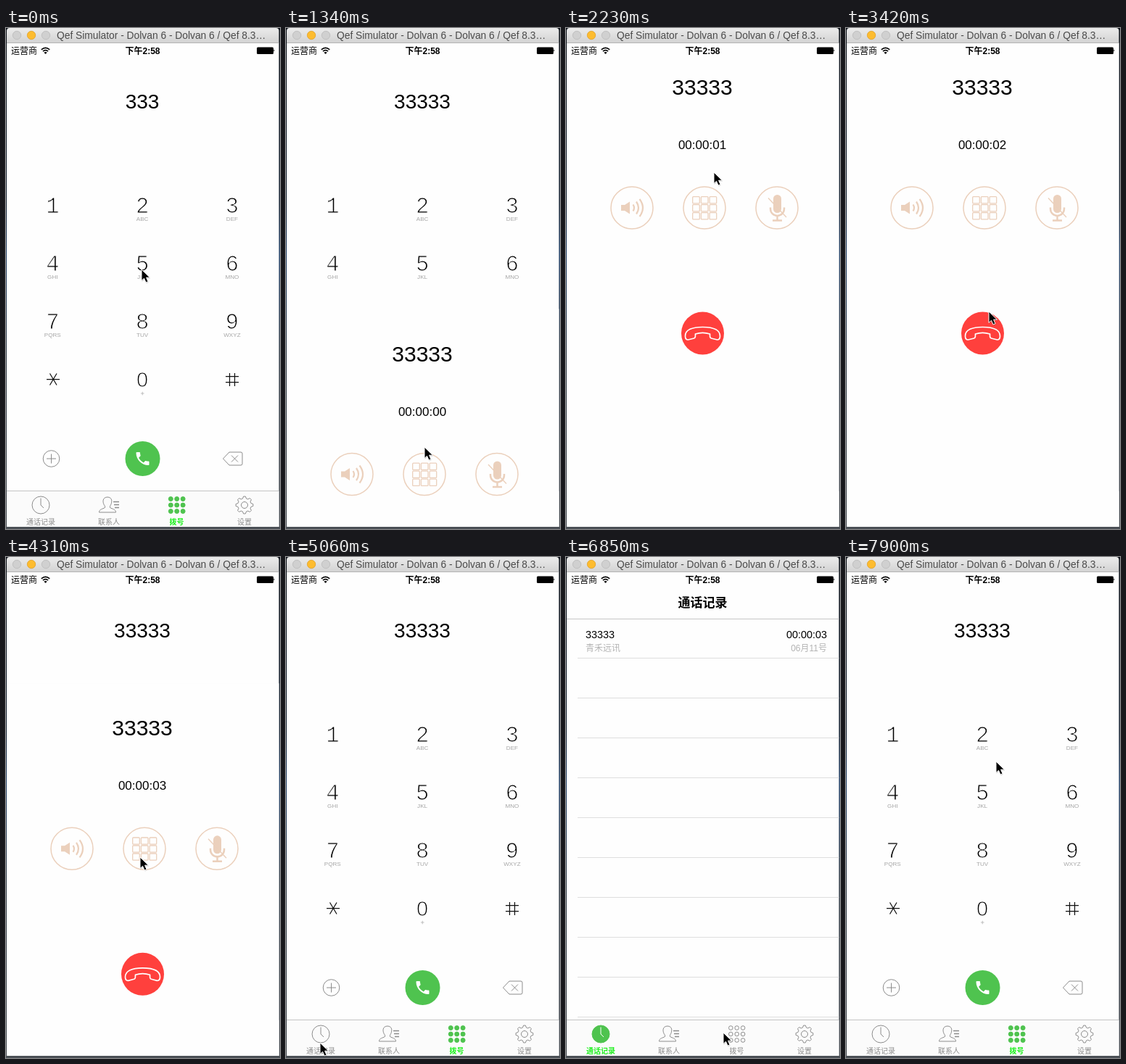
Write an HTML page that moves like this. It is 378 px wide and 691 px high and loops after 8 s.

```html
<!DOCTYPE html>
<html lang="zh">
<head>
<meta charset="utf-8">
<title>Dialer</title>
<style>
html, body { margin: 0; width: 100%; height: 100%; overflow: hidden; background: #1b2430; }
svg { display: block; width: 378px; height: 691px; }
text { font-family: "Liberation Sans", "Noto Sans CJK SC", "Noto Sans CJK", sans-serif; }
.mid { text-anchor: middle; }
.end { text-anchor: end; }
.key { font-family: "Liberation Mono", monospace; font-size: 30.5px; stroke: #fefefe; stroke-width: 1.1; }
.zero { font-family: "Liberation Sans", sans-serif; font-size: 29px; }
.sub { font-size: 8.1px; fill: #a6a6a6; }
.line { fill: none; stroke: #8c8c8c; stroke-width: 1; }
.thin { fill: none; stroke: #111; stroke-width: 1.25; }
.tan { fill: none; stroke: #ebd0bc; stroke-width: 1.5; }
.fill { fill: #ebd0bc; stroke: none; }
.tab { font-size: 10px; fill: #8c8c8c; }
.tab.on { fill: #1df01d; font-weight: bold; }
.small { font-size: 12px; fill: #b4b4b4; }
.row { font-size: 14.4px; }
</style>
</head>
<body>
<svg viewBox="0 0 378 691">
  <defs>
    <linearGradient id="bar" x2="0" y2="1">
      <stop stop-color="#ebebeb"/><stop offset="1" stop-color="#d2d2d2"/>
    </linearGradient>
    <linearGradient id="desk" x2="0" y2="1">
      <stop stop-color="#10151c"/><stop offset=".35" stop-color="#1d2a3a"/>
      <stop offset=".45" stop-color="#2c4a70"/><stop offset=".65" stop-color="#3a444f"/>
      <stop offset="1" stop-color="#4b5056"/>
    </linearGradient>
    <clipPath id="screen"><rect x="1" y="21" width="375.5" height="667"/></clipPath>
  </defs>
  <rect width="378" height="691" fill="url(#desk)"/>
  <path d="M1 21V4q0-4 4-4H372.500q4 0 4 4V21Z" fill="url(#bar)"/>
  <path d="M1 20.500H376.500" stroke="#b3b3b3"/>
  <g stroke-width=".8">
    <circle cx="15" cy="10" r="5.700" fill="#d0d0d0" stroke="#bababa"/>
    <circle cx="35" cy="10" r="5.700" fill="#fdbc2f" stroke="#e0a027"/>
    <circle cx="55" cy="10" r="5.700" fill="#d0d0d0" stroke="#bababa"/>
  </g>
  <text x="70" y="15" font-size="13.8" fill="#4b4b4b">Qef Simulator - Dolvan 6 - Dolvan 6 / Qef 8.3…</text>

  <g clip-path="url(#screen)">
    <rect x="1" y="21" width="376" height="667" fill="#fefefe"/>
    <g id="dial">
      <text id="num" class="mid" x="188" y="111" font-size="28"></text>
      <g id="keys"></g>
      <path class="thin" d="M56 484.500H74M60.500 476.500L70 492.500M70 476.500L60.500 492.500"/>
      <path class="thin" d="M303 480.500H321M303 488.500H321M308.500 476V494M315.500 476V494"/>
      <path d="M186 504H190.500M188.250 501.800V506.300" stroke="#b0b0b0" stroke-width=".8"/>
      <g class="line">
        <circle cx="62.500" cy="594" r="11.300"/>
        <path d="M56 594H69M62.500 587.500V600.500"/>
        <path d="M299.500 594L308 585H324q2 0 2 2V601q0 2-2 2H308ZM311 589.500L320 598.500M320 589.500L311 598.500"/>
      </g>
      <circle cx="188.500" cy="594" r="24" fill="#4fc34f"/>
      <path transform="translate(176.500 582)" fill="#fff" d="M6.600 10.800c1.400 2.800 3.800 5.100 6.600 6.600l2.200-2.200c.3-.3.700-.4 1-.2 1.100.4 2.300.5 3.600.5q1 0 1 1V20q0 1-1 1C10.600 21 3 13.400 3 4q0-1 1-1H7.500q1 0 1 1c0 1.300.2 2.500.6 3.600.1.400 0 .7-.3 1Z"/>
    </g>

    <g id="log">
      <path id="rules" stroke="#dedede"/>
      <path d="M1 85.500H377" stroke="#c6c6c6"/>
      <text class="mid" x="188.500" y="69" font-size="17" font-weight="bold">通话记录</text>
      <text id="entry" class="row" x="27" y="112"></text>
      <text class="row end" x="360" y="112">00:00:03</text>
      <text class="small" x="27" y="130">青禾远讯</text>
      <text class="small end" x="360" y="130">06月11号</text>
    </g>

    <g id="tabs">
      <rect x="1" y="639" width="376" height="49" fill="#fbfbfb"/>
      <path d="M1 638.500H377" stroke="#c3c3c3"/>
      <circle id="clock" cx="48" cy="658" r="12"/>
      <path id="hands" d="M48 648.500V658L52 662" fill="none"/>
      <g class="line">
        <path d="M128.500 668c0-4.500 5-4.500 8-6.500v-2c-4-5-3.500-12.500 3.500-12.500s7 7.500 3.500 12.500v2c3 2 8 2 8 6.500Z"/>
        <path d="M148 653.500H156M149 657.500H156M150 661.500H156" stroke-width="1.300"/>
        <path id="gear"/>
        <circle cx="329" cy="658" r="4.500"/>
      </g>
      <g id="dots"></g>
      <text id="tabLog" class="tab mid" x="48" y="685">通话记录</text>
      <text class="tab mid" x="142" y="685">联系人</text>
      <text id="tabDial" class="tab mid" x="235.500" y="685">拨号</text>
      <text class="tab mid" x="329" y="685">设置</text>
    </g>

    <g id="call">
      <rect x="1" y="20" width="376" height="668" fill="#fefefe"/>
      <text id="callee" class="mid" x="188" y="92" font-size="30"></text>
      <text id="timer" class="mid" x="188" y="167" font-size="17"></text>
      <g class="tan">
        <circle cx="91" cy="248" r="29"/>
        <circle cx="191" cy="248" r="29"/>
        <circle cx="291" cy="248" r="29"/>
        <path class="fill" d="M76 244H81L88 239.500V256.500L81 252H76Z"/>
        <path d="M92.500 243.500q3 4.500 0 9M97 239.500q6 8.500 0 17M101.500 236q9 12 0 24" stroke-width="2.200"/>
        <g id="grid" stroke-width="1.300"></g>
        <rect class="fill" x="286" y="230" width="11" height="25" rx="5.500"/>
        <path d="M282 247.500v2a9.500 9.500 0 0 0 19 0v-2M291.500 259v6M285 265.500H298" stroke-width="2.500"/>
        <path d="M279 234.500L304 261" stroke-width="1.400"/>
      </g>
      <circle cx="188.500" cy="421" r="29.500" fill="#ff403d"/>
      <path transform="translate(188.500 421)" fill="none" stroke="#fff" stroke-width="1.700" d="M-24 4c0-9 10-12.500 24-12.500s24 3.500 24 12.500c0 4-2 5-4 5l-8-2c-2-.5-2-2-2-6-6-2-14-2-20 0 0 4 0 5.500-2 6l-8 2c-2 0-4-1-4-5Z"/>
    </g>

    <text x="7" y="35.500" font-size="12">运营商</text>
    <path d="M48.800 29.800q5.700-5 11.400 0M50.900 32.200q3.600-3 7.200 0" fill="none" stroke="#000" stroke-width="1.700"/>
    <path d="M52.300 33.800q2.200-1.600 4.400 0L54.500 36Z"/>
    <text class="mid" x="188.500" y="35.500" font-size="12" font-weight="bold">下午2:58</text>
    <rect x="346" y="26.500" width="23" height="9.500" rx="1.500"/>
    <path d="M369.500 29.500q2 1.500 0 3Z"/>
  </g>

  <g id="cursor">
    <path d="M0 0V15.500L3.500 12.300L6 18L9 16.800L6.600 11.200H11.500Z" transform="translate(.6 1.300)" fill="#000" opacity=".2"/>
    <path d="M0 0V15.500L3.500 12.300L6 18L9 16.800L6.600 11.200H11.500Z" stroke="#fff" stroke-linejoin="round"/>
  </g>
</svg>
<script>
const LOOP = 8000, HEIGHT = 667, DIGIT = "3";
const CALL_IN = 1256, CALL_OUT = 4259.7, STEP = 150;
const el = id => document.getElementById(id);
const show = (id, on) => el(id).setAttribute("display", on ? "inline" : "none");
const attr = (id, values) => {
  for (const name in values) el(id).setAttribute(name, values[name]);
};

// Pointer stops: time, x, y
const stops = [
  [0, 187, 333], [600, 183, 375], [750, 179, 465], [890, 184, 550], [1040, 191, 578],
  [1490, 193, 525], [1640, 198, 385], [1790, 203, 250], [1940, 204, 199],
  [2980, 203, 230], [3130, 200, 300], [3280, 198, 360], [3420, 197, 391], [3570, 197, 402],
  [4020, 185, 414], [4460, 176, 450], [4610, 148, 535], [4760, 105, 612], [4910, 65, 656],
  [5060, 47, 670], [5660, 105, 430], [5810, 165, 255], [5960, 215, 218], [6110, 245, 300],
  [6260, 254, 402], [6560, 249, 525], [6710, 230, 625], [6850, 217, 656], [7000, 222, 668],
  [7150, 230, 672], [7300, 235, 667], [7450, 236, 660], [7750, 231, 600], [7900, 207, 282]
];

function build() {
  const subs = ["", "ABC", "DEF", "GHI", "JKL", "MNO", "PQRS", "TUV", "WXYZ"];
  let keys = '<text class="key zero mid" x="188" y="494.500">0</text>';
  let grid = "", dots = "", rules = "", gear = "";
  for (let i = 0; i < 9; i++) {
    const col = i % 3, row = Math.floor(i / 3);
    const x = 64.3 + col * 123.8, y = 255 + row * 80;
    keys += `<text class="key mid" x="${x}" y="${y}">${i + 1}</text>` +
      `<text class="sub mid" x="${x}" y="${y + 11}">${subs[i]}</text>`;
    grid += `<rect x="${174.700 + col * 11.700}" y="${232.700 + row * 11}" width="9.600" height="9.200" rx="1"/>`;
    dots += `<circle cx="${227.300 + col * 8.400}" cy="${649.500 + row * 8.500}"/>`;
  }
  for (let y = 139.5; y < 638; y += 55) rules += `M16 ${y}H377`;
  for (let i = 0; i < 32; i++) {
    const r = i % 4 < 2 ? 12 : 9.3;
    const a = (Math.floor(i / 2) + (i % 2 ? 0.3 : -0.3)) * Math.PI / 8 - Math.PI / 2;
    gear += (i ? "L" : "M") + (329 + r * Math.cos(a)).toFixed(2) + " " + (658 + r * Math.sin(a)).toFixed(2);
  }
  el("keys").innerHTML = keys;
  el("grid").innerHTML = grid;
  el("dots").innerHTML = dots;
  attr("rules", { d: rules });
  attr("gear", { d: gear + "Z" });
  el("entry").textContent = el("callee").textContent = DIGIT.repeat(5);
}

// Critically damped spring: share of the way still to go
function remaining(ms) {
  const w = Math.max(0, ms) * 0.0181;
  return (1 + w) * Math.exp(-w);
}

// The screen refreshes in fixed steps after each transition starts
const held = (t, from) => from + Math.floor((t - from + 2) / STEP) * STEP;

function callOffset(t) {
  if (t < 1340 || t >= 5060) return HEIGHT;
  if (t < 1940) return HEIGHT * remaining(held(t, 1340) - CALL_IN);
  if (t < 4310) return 0;
  return HEIGHT * (1 - remaining(held(t, 4310) - CALL_OUT));
}

function draw(t) {
  const log = t >= 5360 && t < 7750;
  const offset = callOffset(t);
  const seconds = [2230, 3280, 4310].filter(s => t >= s).length;
  const [, x, y] = stops.filter(s => t >= s[0]).pop();

  el("num").textContent = DIGIT.repeat(t < 150 ? 3 : t < 300 ? 4 : 5);
  el("timer").textContent = "00:00:0" + seconds;
  show("dial", !log);
  show("log", log);
  show("call", offset < HEIGHT - 0.5);
  attr("call", { transform: `translate(0 ${offset.toFixed(1)})` });
  attr("cursor", { transform: `translate(${x} ${y})` });

  attr("clock", { fill: log ? "#4fc34f" : "none", stroke: log ? "#4fc34f" : "#8c8c8c" });
  attr("hands", { stroke: log ? "#fff" : "#8c8c8c" });
  attr("dots", { fill: log ? "none" : "#4fc34f", stroke: log ? "#8c8c8c" : "#4fc34f" });
  for (const dot of el("dots").children) dot.setAttribute("r", log ? 2.8 : 3);
  el("tabLog").classList.toggle("on", log);
  el("tabDial").classList.toggle("on", !log);
}

build();
draw(0);
const start = performance.now();
function tick() {
  draw((performance.now() - start) % LOOP);
  requestAnimationFrame(tick);
}
requestAnimationFrame(tick);
</script>
</body>
</html>
```
